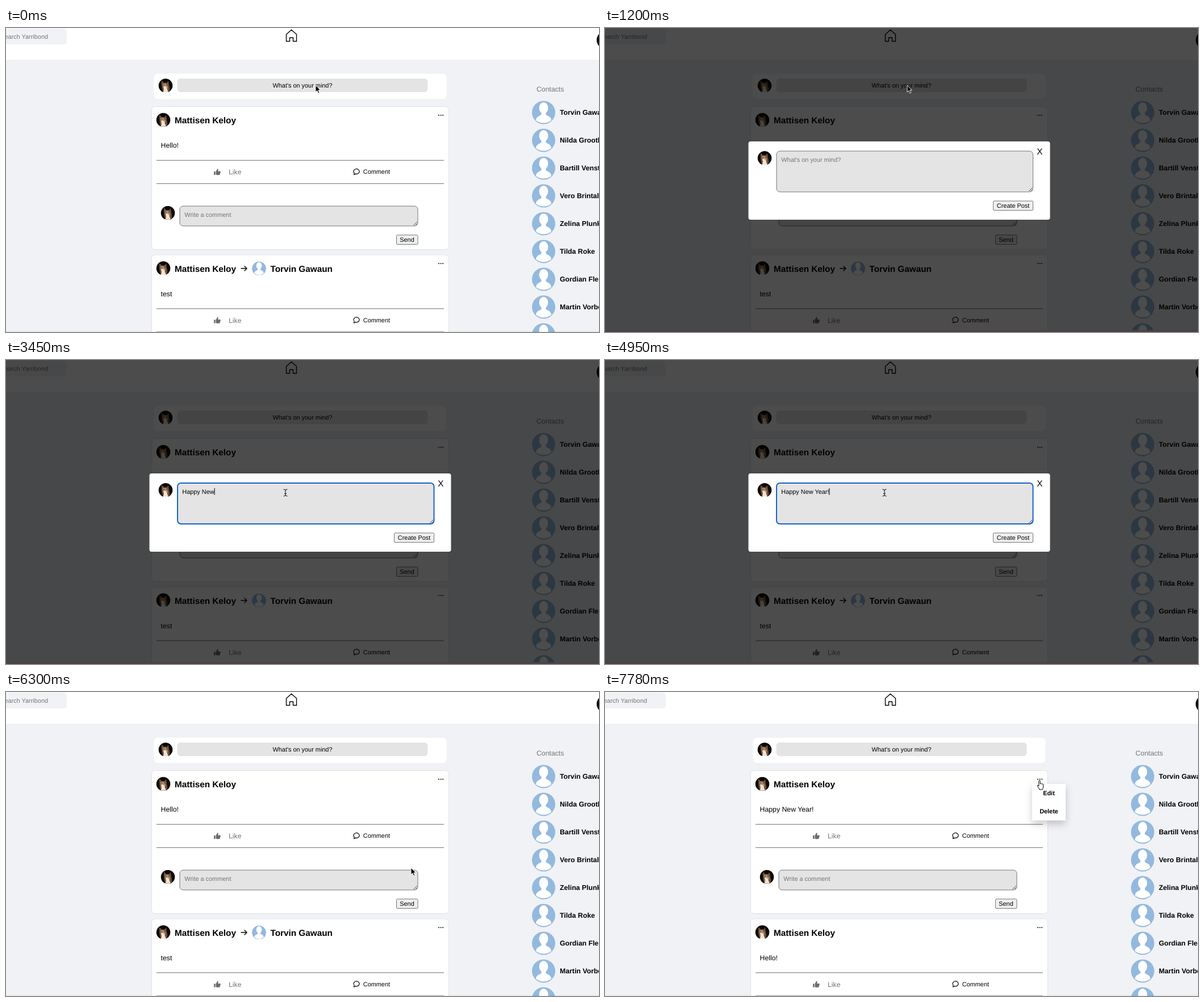
Write an HTML page that moves like this. It is 1044x536 px and loops after 8 s.

```html
<!DOCTYPE html>
<html lang="en">
<head>
<meta charset="utf-8">
<title>Social feed</title>
<style>
  html, body { margin: 0; width: 100%; height: 100%; overflow: hidden; background: #f0f2f5; }
  svg { display: block; }
  text {
    font: 10.9px "Liberation Sans", Arial, Helvetica, sans-serif;
    white-space: pre;
    text-rendering: geometricPrecision;
  }
  .mid { font-size: 12.27px; }
  .name { font-size: 15.3px; font-weight: bold; }
  .bold { font-weight: bold; }
  .soft { fill: #757575; }
  .center { text-anchor: middle; }
  .field { fill: #e4e4e4; stroke: #767676; }
  .button { fill: #efefef; stroke: #767676; }
  .rule { stroke: #8a8a8a; stroke-width: 1.2; }
  .icon { fill: none; stroke: #000; stroke-linejoin: round; stroke-linecap: round; }
  #menu { filter: drop-shadow(0 6.5px 6.5px rgba(0, 0, 0, .2)); }
</style>
</head>
<body>
<svg id="stage" width="1044" height="536" viewBox="0 0 1044 536">
  <defs>
    <clipPath id="flat"><path d="M-5.3 11.6A12.5 12.5 0 1 1 5.3 11.6Z"/></clipPath>
    <g id="cat" clip-path="url(#flat)">
      <circle r="12.5" fill="#0b0908"/>
      <path d="M-7 -9L-3 -5 2 -5 5 -8 6 0Q8 6 6 12H-4Q-8 4 -7 -9Z" fill="#6f5039"/>
      <path d="M-5 -3Q-1 -5 3 -2L4 4Q0 8 -4 4Z" fill="#b58f6c"/>
      <path d="M-4 2Q0 0 2 4L5 12.5H-5Q-2 8 -4 2Z" fill="#efe4d6"/>
      <path d="M-3.5 -1h1.6M1 -1h1.6" stroke="#1c140f" stroke-width="1.2"/>
    </g>
    <g id="person">
      <circle r="20.5" fill="#93b9de"/>
      <ellipse cy="-8" rx="8" ry="10" fill="#fff"/>
      <path d="M-13.5 14C-13 7 -8 6.500 -4 4V0H4V4C8 6.500 13 7 13.500 14Q0 23 -13.500 14Z" fill="#fff"/>
    </g>
  </defs>
</svg>
<script>
const LOOP = 8000, STEP = 150;
const USER = "Mattisen Keloy", FRIEND = "Torvin Gawaun", MESSAGE = "Happy New Year!";
const CONTACTS = [FRIEND, "Nilda Grooth", "Bartill Venstro", "Vero Brintaller", "Zelina Plunkor",
  "Tilda Roke", "Gordian Flebb", "Martin Vorbek", ""];

const text = (x, y, s, cls = "") => `<text x="${x}" y="${y}" class="${cls}">${s}</text>`;
const box = (x, y, w, h, r, attrs) => `<rect x="${x}" y="${y}" width="${w}" height="${h}" rx="${r}" ${attrs}/>`;
const put = (id, x, y, k = 1) => `<use href="#${id}" transform="translate(${x} ${y}) scale(${k})"/>`;
const icon = (d, w = 1.2) => `<path class="icon" d="${d}" stroke-width="${w}"/>`;
const group = (id, body) => `<g id="${id}">${body}</g>`;
const grip = (x, y) => icon(`M${x - 7} ${y - 1.500}L${x - 1.500} ${y - 7}M${x - 3.500} ${y - 1.500}L${x - 1.500} ${y - 3.500}`, .7);
const rule = y => `<path class="rule" d="M265 ${y}H771"/>`;

function post(dy, message, friend) {
  const target = friend ? icon("M414 162.500H424M420 158.500L424 162.500 420 166.500", 1.4) +
    `<g transform="translate(445.5 162.5)" clip-path="url(#flat)">${put("person", 0, 0, .61)}</g>` +
    text(465.5, 168, friend, "name") : "";
  return `<g transform="translate(0 ${dy})">` +
    box(256.5, 138.5, 523, 252, 6, 'fill="#fff" stroke="#dfe2e6"') +
    put("cat", 277, 162) + text(297, 168, USER, "name") + target +
    [762, 765.6, 769.2].map(x => `<circle cx="${x}" cy="153.7" r="1"/>`).join("") +
    text(272.6, 211, message, "mid") +
    rule(233.3) + rule(274.4) +
    '<path d="M366 253h2.600v6h-2.600zM369.500 253L372 248.500q2-.8 1.600 2l-.5 2H377q1.200.6.6 2l-1.200 4q-.4.7-1.400.7H371l-1.500-.8z" fill="#6b6d70"/>' +
    text(392, 258.4, "Like", "mid soft") +
    icon("M612.500 258.300L613.200 255.800A5 4.500 0 1 1 615.500 257.200Q614 258.300 612.500 258.300Z") +
    text(628.8, 257.2, "Comment") +
    put("cat", 285, 326) +
    box(306, 314, 419, 35, 6, 'class="field"') + grip(725, 349) +
    text(314.3, 332.6, "Write a comment", "soft") +
    box(687.5, 365, 37.5, 16.5, 1.5, 'class="button"') + text(706, 376.8, "Send", "center") +
    "</g>";
}

const page =
  box(0, 0, 1044, 536, 0, 'fill="#f0f2f5"') +
  box(0, 0, 1044, 56, 0, 'fill="#fff"') +
  box(-20, 1, 127, 28, 6, 'fill="#f0f2f5"') +
  '<text x="74" y="18.8" class="soft" text-anchor="end">Search Yarribond</text>' +
  icon("M493.500 23.500V11.200L502.500 3.300 511.500 11.200V23.500H505.500V17H499.500V23.500Z", 1.4) +
  put("cat", 1056, 21, 1.3) +
  box(260.5, 80.5, 515, 44.5, 7, 'fill="#fff"') +
  put("cat", 281, 101.5) +
  box(301.5, 89, 441, 24, 6, 'fill="#e4e4e4"') +
  text(522, 104.8, "What's on your mind?", "center") +
  group("before", post(0, "Hello!") + post(261.5, "test", FRIEND)) +
  group("after", post(0, MESSAGE) + post(261.5, "Hello!")) +
  text(934, 112.4, "Contacts", "mid soft") +
  CONTACTS.map((name, i) => put("person", 946.5, 149 + 49 * i) +
    text(975, 153.4 + 49 * i, name, "mid bold")).join("") +
  box(0, 534, 1044, 2, 0, 'fill="#000" opacity=".04"');

const modal =
  box(0, 0, 1044, 536, 0, 'fill="#000" opacity=".7"') +
  box(0, 533, 1044, 3, 0, 'fill="#4c4246"') +
  box(252.5, 200, 531, 138, 4, 'fill="#fff"') +
  put("cat", 281, 229.3) +
  box(302, 217, 451.5, 72, 6, 'id="input" class="field"') + grip(753.5, 289) +
  '<text id="draft" x="310.3" y="235.8"></text>' +
  box(0, 226, 1, 12, 0, 'id="caret"') +
  text(765.3, 222.5, "X", "center big") +
  box(683.5, 305, 70, 16.5, 1.5, 'class="button"') + text(718.6, 316.8, "Create Post", "center");

const menu = box(752, 162, 59, 64.5, 0, 'fill="#fff"') +
  text(781.5, 181.6, "Edit", "bold center") + text(781.5, 213.8, "Delete", "bold center");

const cursors =
  '<path id="arrow" d="M0 0V12L2.800 9.400 4.700 14 6.700 13.100 4.900 8.700H8.600Z" stroke="#fff" stroke-width=".9"/>' +
  '<path id="hand" d="M-1.200 9V1.200a1.200 1.200 0 0 1 2.400 0V6q1-1 2 0 1-.7 1.800.3 1.200-.5 1.600.6V11q0 2.500-1.400 5H-.2Q-1 13-3 11-4.500 8.800-3.200 8.400-2 8.400-1.200 10Z" fill="#fff" stroke="#000"/>' +
  '<path id="beam" class="icon" d="M-3-6Q0-6 0-4 0-6 3-6M0-4V4M-3 6Q0 6 0 4 0 6 3 6M-1.500 1.500H1.500"/>';

document.getElementById("stage").insertAdjacentHTML("beforeend",
  page + group("menu", menu) + group("modal", modal) + group("cursor", cursors));

const $ = id => document.getElementById(id);
const show = (id, on) => { $(id).style.display = on ? "" : "none"; };
document.querySelector(".big").style.fontSize = "15.3px";

// Time at which each letter of the message is typed.
const KEYS = [2400, 2550, 2700, 2850, 3000, 3150, 3300, 3300, 3450, 3600, 3750, 3900, 4050, 4650, 4950];

// Pointer stops: time, x, y.
const PATH = [
  [0, 545, 101], [750, 545, 101], [1050, 532, 101], [1200, 532, 101], [1800, 492, 234],
  [5250, 492, 234], [6000, 713, 310], [6750, 713, 310], [7650, 765, 156], [LOOP, 765, 156]
];

function pointer(t) {
  const i = PATH.findIndex(p => p[0] > t);
  const [t0, x0, y0] = PATH[i - 1], [t1, x1, y1] = PATH[i];
  const u = (t - t0) / (t1 - t0), k = u * u * (3 - 2 * u);
  return [x0 + (x1 - x0) * k, y0 + (y1 - y0) * k];
}

function draw(t) {
  const open = t >= 1200 && t < 6300;
  const focus = t >= 1950 && t < 6150;
  show("modal", open);
  show("before", t < 6450);
  show("after", t >= 6450);
  show("menu", t >= 7780);

  if (open) {
    const typed = MESSAGE.slice(0, KEYS.filter(k => k <= t).length);
    const draft = $("draft");
    draft.textContent = typed || "What's on your mind?";
    draft.setAttribute("class", typed ? "" : "soft");
    $("caret").setAttribute("x", 310.3 + (typed ? draft.getComputedTextLength() : 0));
    show("caret", focus);
    $("input").style.stroke = focus ? "#1463cc" : "";
    $("input").style.strokeWidth = focus ? 2 : 1;
  }

  const [x, y] = pointer(Math.floor(t / STEP) * STEP);
  const hand = (t >= 300 && t < 1200) || t >= 7650;
  const beam = open && x > 302 && x < 754 && y > 217 && y < 289;
  show("hand", hand);
  show("beam", beam);
  show("arrow", !hand && !beam);
  $("cursor").setAttribute("transform", `translate(${x} ${y})`);
}

const start = performance.now();
function tick() {
  draw((performance.now() - start) % LOOP);
  requestAnimationFrame(tick);
}
tick();
</script>
</body>
</html>
```
